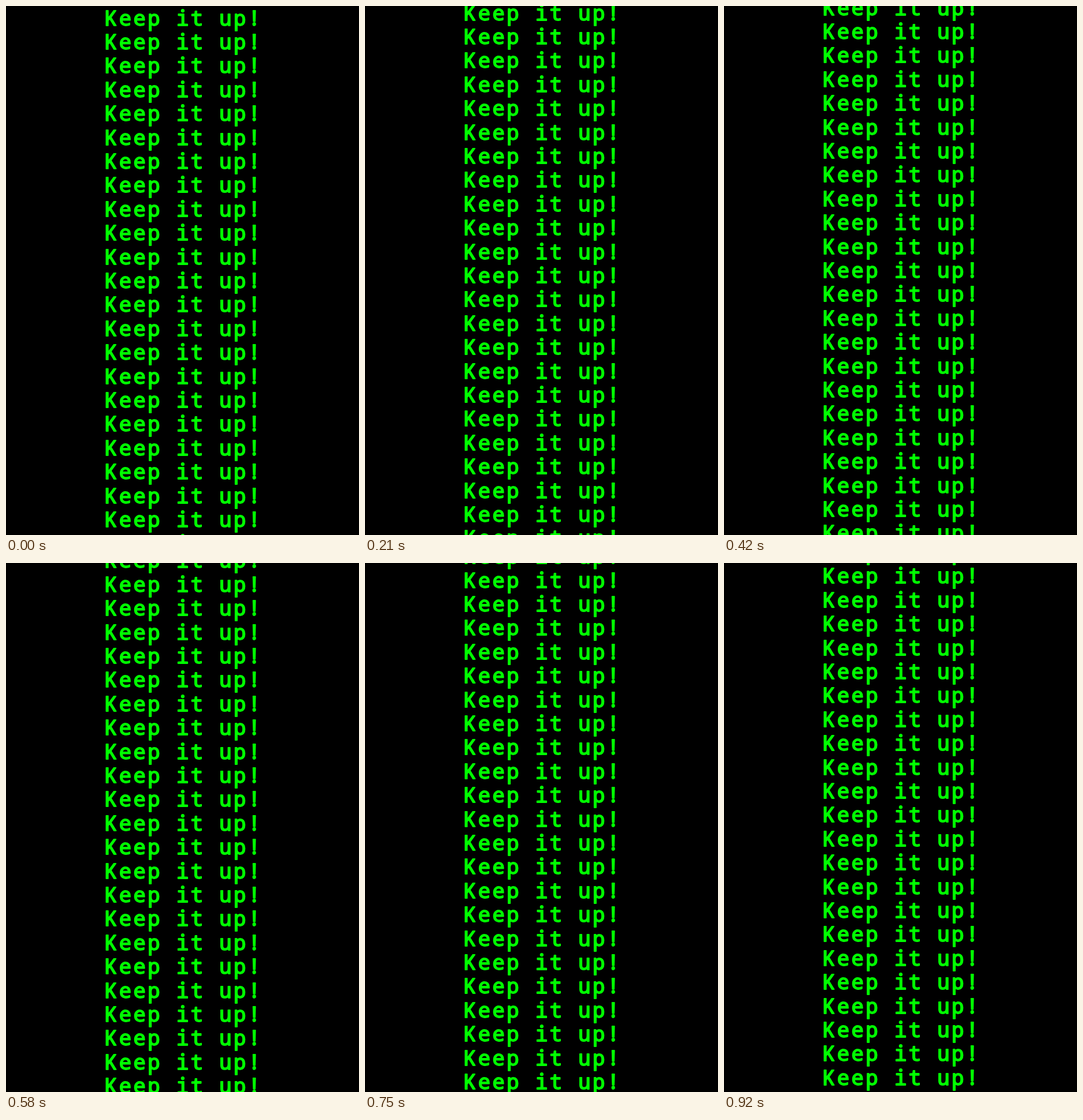
Recreate the animation shown at these times as an HTML page. Size 611 by 917 pixels, loop 960 ms.

```html
<!DOCTYPE html>
<html lang="en">
<head>
<meta charset="utf-8">
<title>Keep it up!</title>
<style>
  html, body { margin: 0; width: 100%; height: 100%; overflow: hidden; background: #000; }
  svg { display: block; width: 611px; height: 917px; }
  text {
    font: 35.5px "Noto Sans Mono", "DejaVu Sans Mono", monospace;
    letter-spacing: 3.5px;
    white-space: pre;
    fill: #0f0;
    stroke: #0f0;
    stroke-width: 1.9px;
    stroke-linejoin: round;
  }
</style>
</head>
<body>
<svg viewBox="0 0 611 917"><g id="lines"></g></svg>
<script>
  const LOOP = 960, STEPS = 23, LINE = 41.4, ROWS = 24;
  const lines = document.getElementById("lines");

  for (let row = 0; row < ROWS; row++) {
    const line = document.createElementNS("http://www.w3.org/2000/svg", "text");
    line.setAttribute("x", 170.9);
    line.setAttribute("y", 33.6 + row * LINE);
    line.textContent = "Keep it up!";
    lines.append(line);
  }

  // Steps fall on the nearest 10 ms; one loop scrolls exactly one line.
  function draw(now) {
    const tick = Math.floor((now % LOOP) / 10) * 10;
    const step = Math.floor((tick + 5) * STEPS / LOOP);
    lines.setAttribute("transform", `translate(0 ${-step * LINE / STEPS})`);
  }

  const start = performance.now();
  function frame() {
    draw(performance.now() - start);
    requestAnimationFrame(frame);
  }
  frame();
</script>
</body>
</html>
```
